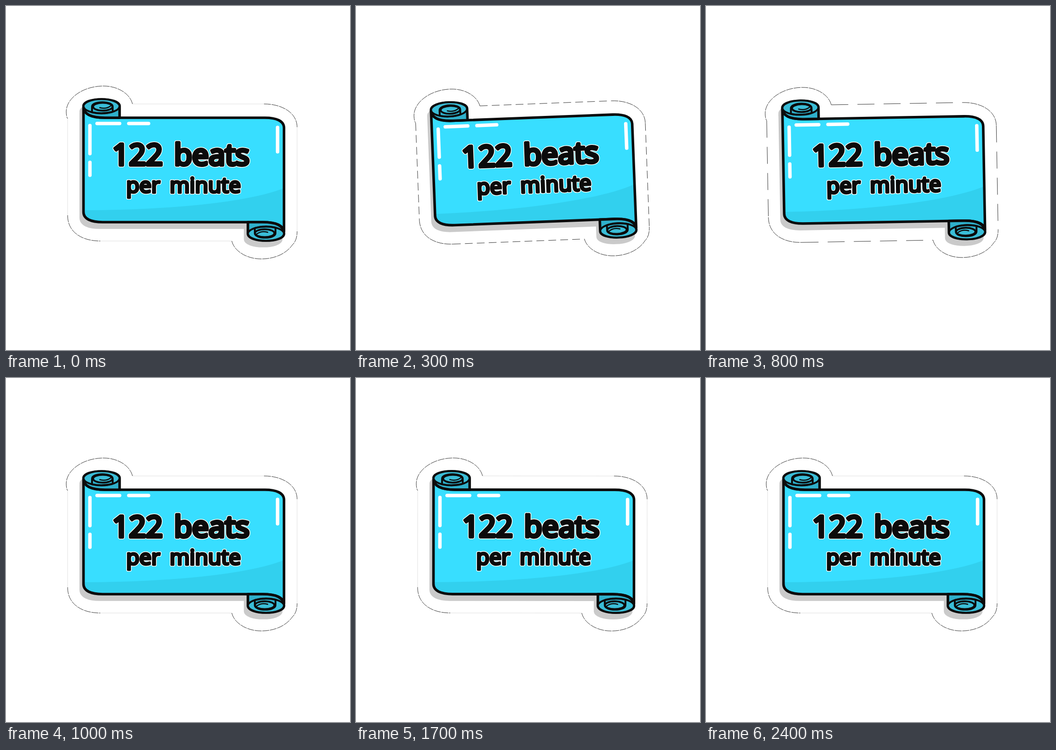
Recreate the animation shown at these times as an HTML page. Size 748x748 px, loop 2.5 s.

```html
<!DOCTYPE html>
<html lang="en">
<head>
<meta charset="utf-8">
<title>122 beats per minute</title>
<style>
  html, body { margin: 0; width: 100%; height: 100%; overflow: hidden; background: #fff; }
  svg { display: block; width: 100vw; height: 100vh; }
  .ink { stroke: #0b0b0b; stroke-width: 5.6; stroke-linejoin: round; stroke-linecap: round; }
  .thin { stroke-width: 4; }
  .edge { fill: none; stroke: #1c1c1c; stroke-width: .9; }
  .curve { stroke-dasharray: 15 1.5; }
  .gloss { fill: none; stroke: #fff; stroke-width: 7.5; stroke-linecap: round; }
  text { font-family: "Open Sans", "Noto Sans", sans-serif; font-weight: 400; }
  .big { font-size: 64px; stroke-width: calc(7px + var(--halo)); }
  .small { font-size: 46.5px; stroke-width: calc(5px + var(--halo)); }
  .letters { --halo: 0px; fill: #0b0b0b; stroke: #0b0b0b; stroke-linejoin: round; }
  .outline { --halo: 3px; fill: #fff; stroke: #fff; stroke-linejoin: round; }
</style>
</head>
<body>
<svg viewBox="0 0 748 748">
  <defs>
    <path id="sheet" d="M168.5 220V448C168.5 463 185 470 210 470H558C583 470 603 475 604.5 491V265C604.5 250 588 243 563 243H215C190 243 170 238 168.5 220Z"/>
    <path id="rollBody" d="M168.5 218C168.5 198 247 198 247 218V243H215C190 243 168.5 238 168.5 218Z"/>
    <g id="roll">
      <use href="#rollBody" class="ink" fill="#2fb0cb"/>
      <ellipse class="ink thin" cx="207.7" cy="218" rx="39" ry="15.5" fill="#3abdd7"/>
      <path class="ink thin" fill="#2fb0cb" d="M187 231V219C187 206 232 206 232 219V230Q210 236 187 231Z"/>
      <ellipse class="ink thin" cx="210.5" cy="219" rx="21" ry="8.5" fill="#3abdd7"/>
      <path class="ink" fill="none" style="stroke-width: 2.5" d="M204 221Q218 225 228 217"/>
    </g>
  </defs>

  <g id="banner">
    <path class="edge curve" d="M275 213C270 192 245 174 212 174C168 174 131 200 131 230Q131 240 134 245M134 455C134 492 165 511 205 511M491 511C496 532 522 550 555 550C585 550 610 538 623 519Q633 510 633 490M561 213C600 213 633 232 633 264"/>
    <path id="straights" class="edge" d="M134 245V455M205 511H491M633 264V490M275 213H561"/>

    <g transform="translate(-6 12)" fill="#cacaca" stroke="#cacaca" stroke-width="5.6">
      <use href="#sheet"/>
      <use href="#rollBody"/>
      <use href="#rollBody" transform="rotate(180 386.5 356.5)"/>
    </g>

    <use href="#sheet" fill="#38deff"/>
    <path fill="#32d0ee" d="M168.5 444C330 444 520 430 604.5 396V491C603 475 583 470 558 470H210C185 470 168.5 463 168.5 444Z"/>
    <use href="#sheet" class="ink" fill="none"/>
    <use href="#roll"/>
    <use href="#roll" transform="rotate(180 386.5 356.5)"/>

    <path class="gloss" d="M182.5 260V321M182.5 340V368M198 255.5H247M267 255.5H310M590.5 264V317"/>

    <use href="#words" class="outline"/>
    <g class="letters">
      <g id="words">
        <text class="big" x="231" y="345.5">122</text>
        <text class="big" x="365.5" y="345.5">beats</text>
        <text class="small" x="261.5" y="405.5">per</text>
        <text class="small" x="356" y="405.5">minute</text>
      </g>
    </g>
  </g>
</svg>
<script>
  const LOOP = 2500, STEP = 100, SWING = 2400, PERIOD = 480, AMPLITUDE = 20.3;
  const banner = document.getElementById("banner");
  const straights = document.getElementById("straights");

  // Elastic settle: a decaying sine that starts 30 degrees before its zero.
  function angleAt(ms) {
    if (ms < STEP || ms >= SWING) return 0;
    const decay = 2 ** (-10 * ms / SWING);
    return AMPLITUDE * decay * Math.sin(2 * Math.PI * ms / PERIOD - Math.PI / 6);
  }

  // The hairline breaks wherever a tilted straight edge crosses a pixel row,
  // and fades to a faint line when level.
  function breakEdges(angle) {
    const slope = Math.abs(Math.sin(angle * Math.PI / 180));
    const tilted = slope > 0.002;
    straights.style.strokeOpacity = tilted ? 1 : 0.15;
    straights.style.strokeDasharray = tilted ? `${0.65 / slope} ${0.35 / slope}` : "none";
  }

  function render(ms) {
    const angle = angleAt(Math.floor(ms % LOOP / STEP) * STEP);
    banner.setAttribute("transform", `rotate(${angle} 382 362)`);
    breakEdges(angle);
  }

  const start = performance.now();
  function tick() {
    render(performance.now() - start);
    requestAnimationFrame(tick);
  }
  tick();
</script>
</body>
</html>
```
